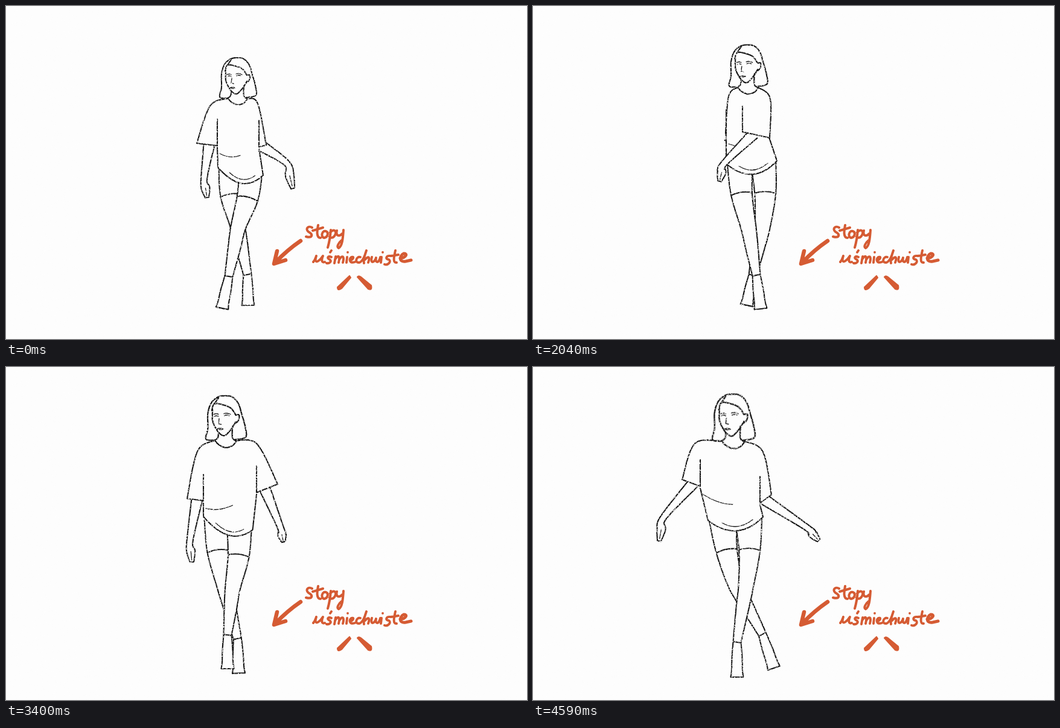
An HTML page that plays this animation: 863x553 px, repeating every 4760 ms.

```html
<!DOCTYPE html>
<html lang="pl">
<head>
<meta charset="utf-8">
<title>stopy uśmiechnięte</title>
<style>
  html, body { margin: 0; width: 100%; height: 100%; overflow: hidden; background: #fdfdfd; }
  svg { display: block; width: 863px; height: 553px; }
  path { fill: none; stroke-linecap: round; stroke-linejoin: round; }
  #pencil { stroke: #111; stroke-width: 2.1; filter: url(#grain); }
  #pencil .ink { fill: #fdfdfd; }
  #pencil .paper { fill: #fdfdfd; stroke: none; }
  #pencil .thin { stroke-width: 1.3; }
  #brush { stroke: #d55b33; }
</style>
</head>
<body>
<svg viewBox="0 0 863 553" role="img" aria-label="stopy uśmiechnięte">
  <filter id="grain" filterUnits="userSpaceOnUse" x="0" y="0" width="863" height="553" color-interpolation-filters="sRGB">
    <feTurbulence type="fractalNoise" baseFrequency=".45" numOctaves="2" seed="4"/>
    <feColorMatrix values="0 0 0 0 .992  0 0 0 0 .992  0 0 0 0 .992  0 0 0 -5 2.4" result="paper"/>
    <feMerge><feMergeNode in="SourceGraphic"/><feMergeNode in="paper"/></feMerge>
  </filter>
  <g id="pencil"><g id="body"></g><g id="head"></g></g>
  <g id="brush">
    <path stroke-width="6.5" d="M488,390 Q466,405 446,426 M449,407 L444,428 L463,422"/>
    <path stroke-width="4" d="M507,368 C501,364 495,370 501,375 C509,379 508,386 497,383
      M517,364 C515,374 514,385 521,385 M508,373 L525,368
      M530,374 C523,372 521,384 527,385 C533,384 535,376 530,374
      M538,372 C537,384 535,394 533,401 M537,376 C544,368 549,375 544,382 C541,386 537,385 536,383
      M548,373 C546,381 551,384 557,378 M559,372 C558,386 557,399 551,402 C547,400 551,393 556,389"/>
    <path stroke-width="3.9" d="M509,425 C512,422 513,417 514,415 C511,425 514,428 522,419 L525,415 C522,422 523,427 528,425
      M539,417 C533,414 531,419 536,421 C541,424 535,428 531,427 M537,409 L539,406
      M544,427 L546,416 M545,421 C550,413 554,414 551,426 M552,421 C557,413 561,415 558,426
      M565,417 L564,426 M566,409 L566,409
      M570,422 C576,421 577,415 572,417 C567,421 570,428 578,425
      M587,417 C580,415 577,427 585,426 C590,425 594,416 597,406 C594,414 592,422 593,427
      M595,421 C601,414 603,417 600,426 M606,417 C603,428 610,427 613,418 C611,428 618,427 620,417
      M622,417 L621,426 M624,409 L624,409
      M637,415 C629,414 628,421 634,421 C639,424 633,431 627,429
      M645,406 C643,415 640,427 647,426 M638,415 L650,413"/>
    <path stroke-width="5" d="M653,419 C662,418 666,411 659,411 C652,414 650,426 662,424 L671,422"/>
    <path stroke-width="2" style="fill:#d55b33"
      d="M569,448 L571,451 L556,469 Q549,474 549,467 Z M582,450 Q584,447 588,450 L605,464 Q607,473 600,470 Z"/>
  </g>
</svg>
<script>
const STEP = 170, STEPS = 28, SMOOTH = 8;

// Points of each side: shoulder, outer cuff, inner cuff, hem, wrist, fingertips, knee, ankle, toes.
const poses = [
  { at: 0, front: 'R', head: '378,117',
    L: '338,166 316,228 350,232 351,268 328,287 333,318 383,362 400,446 401,497',
    R: '417,162 431,231 419,234 426,281 465,261 475,303 385,366 369,449 358,502' },
  { at: 4, front: 'R', head: '365,109',
    L: '317,153 295,217 319,224 330,262 285,270 281,304 369,365 386,439 400,489',
    R: '411,162 424,227 408,238 410,262 480,240 501,261 384,365 368,447 357,499' },
  { at: 8, front: 'L', head: '356,95',
    L: '319,140 310,207 317,210 318,252 304,274 302,304 326,345 337,392 337,447',
    R: '402,156 415,215 371,215 387,264 395,256 397,278 379,365 368,443 354,495' },
  { at: 12, front: 'L', head: '350,97',
    L: '324,150 319,212 320,216 320,262 350,222 360,224 357,368 370,447 377,503',
    R: '393,154 392,219 347,209 404,257 316,262 309,291 380,368 364,447 354,497' },
  { at: 18, front: 'L', head: '360,86',
    L: '322,148 311,226 325,223 327,245 318,295 321,330 361,365 381,453 383,510',
    R: '421,128 460,191 419,206 406,279 479,257 489,278 389,367 396,433 407,485' },
  { at: 22, front: 'R', head: '355,78',
    L: '312,132 289,211 329,221 327,252 291,283 295,318 362,360 386,449 388,507',
    R: '411,128 440,198 411,211 411,262 430,275 430,303 362,367 338,457 327,517' },
  { at: 27, front: 'R', head: '325,81',
    L: '268,127 247,187 277,198 290,255 216,250 209,289 336,362 380,444 399,500',
    R: '381,141 395,212 376,226 381,249 454,267 473,288 353,362 338,457 338,515' },
];

const parse = text => text.split(' ').map(p => p.split(',').map(Number));
const mix = (p, q, t) => p.map((v, i) => v + (q[i] - v) * t);
const move = (p, x, y) => [p[0] + x, p[1] + y];
const line = points => 'M' + points.map(([x, y]) => x.toFixed(1) + ',' + y.toFixed(1)).join('L');
const path = (type, d) => `<path class="${type}" d="${d}"/>`;

// Catmull-Rom curve through points of any dimension.
function curve(points) {
  const last = points.length - 1;
  const get = i => points[Math.max(0, Math.min(last, i))];
  return Array.from({ length: last * SMOOTH + 1 }, (_, k) => {
    const i = Math.min(Math.floor(k / SMOOTH), last - 1), t = k / SMOOTH - i;
    return points[0].map((_, axis) => {
      const [a, b, c, d] = [-1, 0, 1, 2].map(n => get(i + n)[axis]);
      return b + t / 2 * (c - a + t * (2 * a - 5 * b + 4 * c - d + t * (3 * (b - c) + d - a)));
    });
  });
}

// Outline around a centre line; every entry is [point, half width].
function tube(...joints) {
  const spine = curve(joints.map(([p, width]) => [...p, width]));
  const edge = sign => spine.map(([x, y, width], i) => {
    const p = spine[Math.max(0, i - 1)], q = spine[Math.min(spine.length - 1, i + 1)];
    const dx = q[0] - p[0], dy = q[1] - p[1], k = sign * width / (Math.hypot(dx, dy) || 1);
    return [x - dy * k, y + dx * k];
  });
  const a = edge(1), b = edge(-1);
  return { a, b, d: line([...a, ...b.slice().reverse()]) };
}

function arm({ cuff, inner, wrist, tip }) {
  const palm = mix(wrist, tip, .5);
  return path('ink', tube([mix(inner, cuff, .4), 9], [wrist, 5], [palm, 7], [tip, 3]).d) +
    path('thin', line([palm, mix(palm, tip, .8)]));
}

function leg({ sign, hip, hipWidth, knee, ankle, toe }) {
  const thigh = move(mix(hip, knee, .48), sign * 4, 0);
  const limb = tube([hip, hipWidth], [thigh, 17.5], [knee, 12.5], [mix(knee, ankle, .4), 10.5], [ankle, 6.5]);
  const a = limb.a[SMOOTH], b = limb.b[SMOOTH];
  return path('ink', tube([ankle, 6.5], [mix(ankle, toe, .45), 8.5], [mix(ankle, toe, .8), 9], [toe, 10.5]).d) +
    path('ink', limb.d) + path('line', `M${a}Q${move(mix(a, b, .5), 0, -6)} ${b}`);
}

const sleeve = ({ neck, shoulder, cuff, inner }) =>
  path('ink', line([...curve([neck, shoulder, cuff]), inner, move(inner, 0, -44)]));

function shirt(L, R) {
  const hem = `${L.hem}Q${move(mix(L.hem, R.hem, .5), 3, 40)} ${R.hem}`;
  const fold = (from, to, depth) => path('thin', `M${from}Q${move(mix(from, to, .5), 0, depth)} ${to}`);
  return path('paper', `${line([L.neck, L.shoulder, L.waist])}L${hem}L${R.waist}L${R.shoulder}L${R.neck}Z`) +
    path('line', `M${L.waist}L${hem}L${R.waist}`) +
    fold(move(mix(L.hem, R.hem, .25), 0, 5), move(mix(L.hem, R.hem, .82), 0, 3), 18) +
    fold(move(L.waist, 4, 10), move(mix(L.waist, R.waist, .55), 0, 12), 8);
}

function makeSide(points, sign, head, scale) {
  const [shoulder, cuff, inner, hem, wrist, tip, knee, ankle, toe] = points;
  const waistX = sign < 0 ? Math.min(inner[0], hem[0] + 15) : Math.max(inner[0], hem[0] - 15);
  return { sign, shoulder, cuff, inner, hem, wrist, tip, knee, ankle, toe,
    waist: [waistX, inner[1] + 3],
    neck: move(head, (5.5 + sign * 16.5) * scale, 36.5 * scale) };
}

function draw(step) {
  const index = poses.findLastIndex(p => p.at <= step);
  const from = poses[index], to = poses[index + 1] || from;
  const t = to === from ? 0 : (step - from.at) / (to.at - from.at);
  const between = key => from[key].map((p, i) => mix(p, to[key][i], t));

  const [head] = between('head');
  const scale = 1 + .16 * (step / (STEPS - 1)) ** 1.5;
  const L = makeSide(between('L'), -1, head, scale), R = makeSide(between('R'), 1, head, scale);
  for (const [own, other] of [[L, R], [R, L]]) {
    own.hip = mix(own.hem, other.hem, .27);
    own.hipWidth = (R.hem[0] - L.hem[0]) / 4;
  }
  const legs = (t < .5 ? from : to).front === 'R' ? [L, R] : [R, L];

  document.getElementById('body').innerHTML =
    arm(L) + legs.map(leg).join('') + shirt(L, R) + sleeve(L) + arm(R) + sleeve(R);
  document.getElementById('head').setAttribute('transform', `translate(${head}) scale(${scale})`);
}

const headLines = [
  '-13,36 -24,34 -21,18 -21,-4 -16,-20 -6,-29 5,-31 16,-29 25,-19 30,-3 35,15 36,31 20,35',
  '-5,-28 -11,-19', '-15,-9 -11,-19 3,-17 14,-12 21,-2',
  '-14,-10 -14,6 -9,18 -3,26 4,29 11,23 17,15 21,8', '21,-2 26,-2 25,6 21,10',
  '-5,24 -6,32 -11,36', '16,15 16,32 22,37', '-11,36 -4,43 6,47 16,44 22,37',
];
const features = 'M-12-3q4-2 7 0m0 3q-3-2-6 0m14-4q5-2 10 1m-2 2q-4-2-7 0m-8 4l-1 8l4 1m-6 7q4-2 9 0q-4 2-9 0';
document.getElementById('head').innerHTML =
  headLines.map(text => path('line', line(curve(parse(text))))).join('') + path('thin', features);

for (const pose of poses) for (const key of ['head', 'L', 'R']) pose[key] = parse(pose[key]);

let shown = -1;
function tick() {
  const step = Math.floor(performance.now() / STEP) % STEPS;
  if (step !== shown) draw(shown = step);
  requestAnimationFrame(tick);
}
tick();
</script>
</body>
</html>
```
